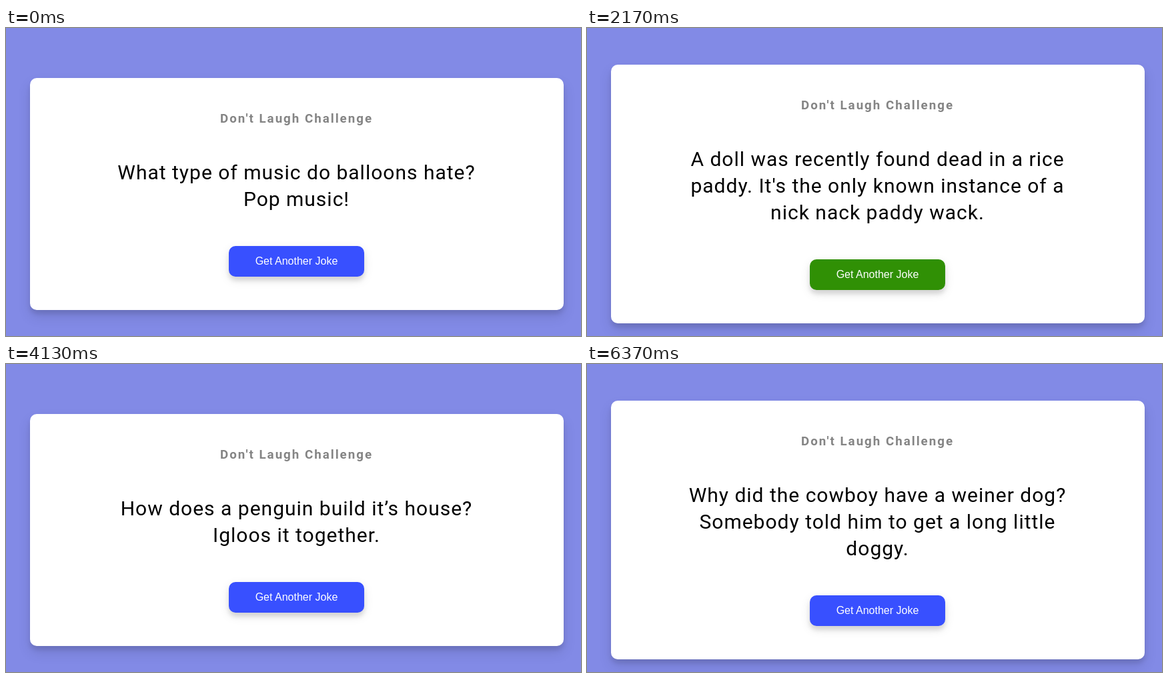
An HTML page for the animation above (6.72 s loop, 862 by 462 pixels).

```html
<!DOCTYPE html>
<html lang="en">
<head>
<meta charset="utf-8">
<title>Don't Laugh Challenge</title>
<style>
  :root { --loop: 6720ms step-end infinite; --blue: #3850ff; --green: #309005; }
  * { box-sizing: border-box; }
  html, body { margin: 0; width: 100%; height: 100%; overflow: hidden; }
  body { position: relative; background: #828ae6; font-family: Roboto, sans-serif; }

  .card {
    position: absolute; left: 35.5px; top: 75px; width: 800px;
    padding: 50px 20px; border-radius: 10px; background: #fff; text-align: center;
    box-shadow: 0 10px 20px rgba(0, 0, 0, .1), 0 6px 6px rgba(0, 0, 0, .1);
    animation: lift var(--loop);
  }
  h1 {
    margin: 0; font-size: 18.72px; line-height: 22px; font-weight: 700;
    letter-spacing: 2px; color: #848484;
  }
  .window {
    position: relative; height: 80px; margin: 50px auto; overflow: hidden;
    animation: grow var(--loop);
  }
  .jokes {
    position: absolute; left: 0; top: 0; width: 100%;
    font-size: 30px; line-height: 40px; letter-spacing: 1px; color: #000;
    white-space: nowrap; animation: next var(--loop);
  }
  .jokes p { margin: 0; height: 120px; }
  button {
    display: block; margin: 0 auto; padding: 14px 40px; border: 0; border-radius: 10px;
    font: 16px/18px "Liberation Sans", Arial, sans-serif; color: #fff; background: var(--blue);
    box-shadow: 0 5px 15px rgba(0, 0, 0, .1), 0 6px 6px rgba(0, 0, 0, .1);
    animation: tint var(--loop);
  }

  /* Each click swaps the joke, and some jokes need a third line. */
  @keyframes next {
    0% { top: 0; }
    30.2% { top: -120px; }
    48.95% { top: -240px; }
    64.58% { top: -360px; }
    82.29%, 100% { top: -480px; }
  }
  @keyframes lift {
    0%, 48.95% { top: 75px; }
    30.2%, 82.29%, 100% { top: 55px; }
  }
  @keyframes grow {
    0%, 48.95% { height: 80px; }
    30.2%, 82.29%, 100% { height: 120px; }
  }
  @keyframes tint {
    0%, 48.95%, 82.29%, 100% { background: var(--blue); }
    30.2%, 64.58% { background: var(--green); }
  }
</style>
</head>
<body>
  <main class="card">
    <h1>Don't Laugh Challenge</h1>
    <div class="window">
      <div class="jokes">
        <p>What type of music do balloons hate?<br>Pop music!</p>
        <p>A doll was recently found dead in a rice<br>paddy. It's the only known instance of a<br>nick nack paddy wack.</p>
        <p>How does a penguin build it’s house?<br>Igloos it together.</p>
        <p>I've just written a song about a tortilla.<br>Well, it is more of a rap really.</p>
        <p>Why did the cowboy have a weiner dog?<br>Somebody told him to get a long little<br>doggy.</p>
      </div>
    </div>
    <button type="button">Get Another Joke</button>
  </main>
</body>
</html>
```
